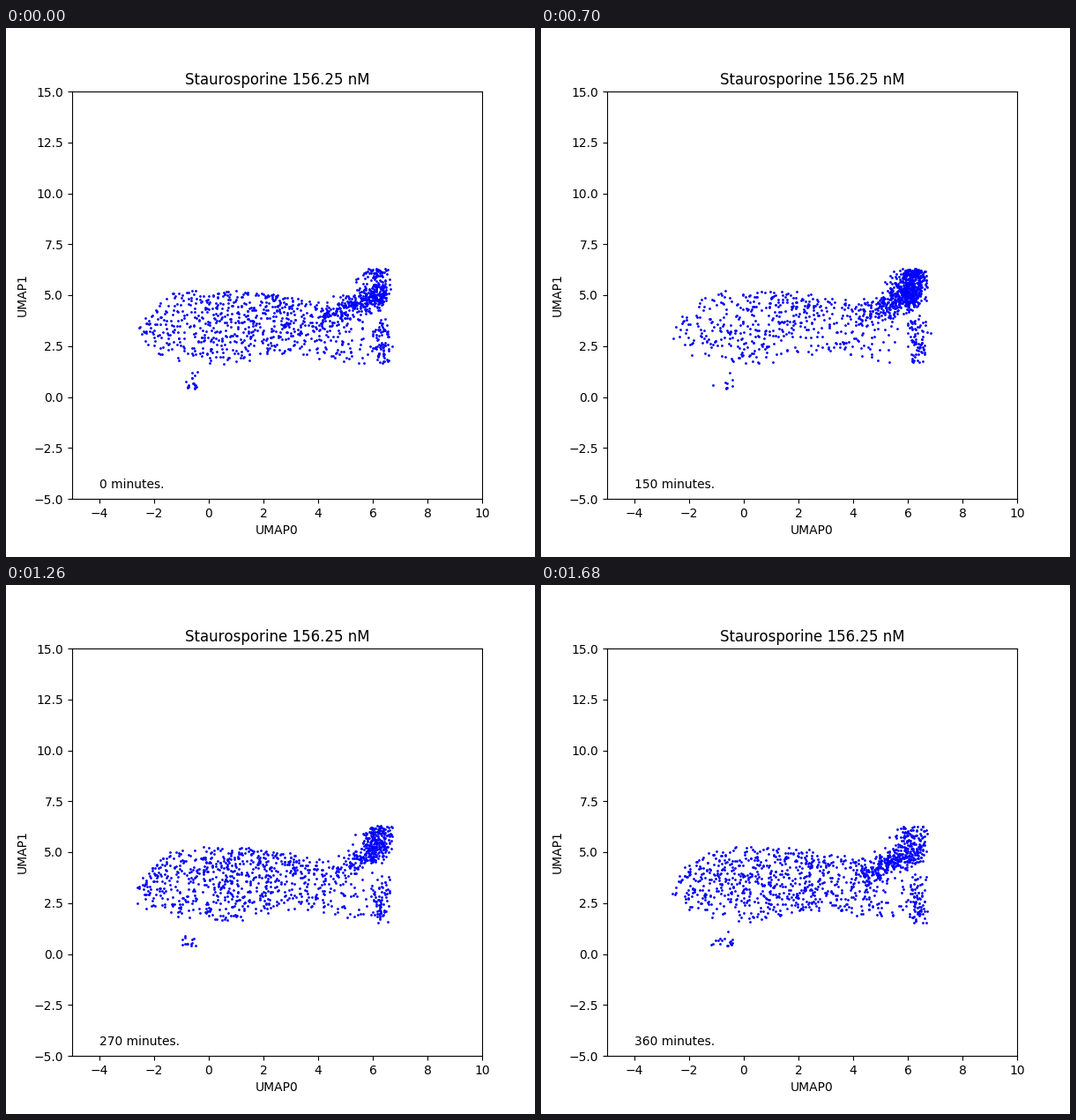
These frames come from a looping animation (600 px wide and 600 px high, 1820 ms). A matplotlib script:

```python
import numpy as np
import matplotlib.pyplot as plt
from matplotlib.animation import FuncAnimation

FRAMES, INTERVAL, STEP = 13, 140, 30

plt.rcParams["text.kerning_factor"] = 6


def bump(t, center, width):
    return np.exp(-0.5 * ((t - center) / width) ** 2)


def body(rng, n, lean):
    """Wide band with a rounded left end and a waist near x = 3."""
    x = -2.65 + 8.75 * rng.beta(1.6, 1.75 + 0.55 * lean, n)
    end = np.clip((x + 2.7) / 1.9, 0, 1)
    cap = np.sqrt(1 - (1 - end) ** 2)
    top = 5.25 - 0.05 * (x - 0.5) ** 2
    bottom = 1.85 - 0.3 * np.cos(1.05 * x)
    low, high = 2.6 + cap * (bottom - 2.6), 2.6 + cap * (top - 2.6)
    y = low + (high - low) * rng.beta(1.2, 1.0, n)
    return x, y + rng.normal(0, 0.06, n)


def arm(rng, n):
    """Dense streak rising from the waist to the head."""
    x = 4.0 + 2.5 * rng.beta(1.8, 1.2, n)
    return x, 3.95 + 0.48 * (x - 4.1) + rng.normal(0, 0.31, n).clip(-0.7, 0.8)


def head(rng, n):
    y = 4.4 + 1.9 * rng.beta(1.8, 1.2, n)
    x = 6.1 + 0.18 * (y - 5.4) + rng.normal(0, 0.33, n)
    return np.where(x > 6.7, 12.75 - x, x), y


def strip(rng, n):
    x = 6.33 + rng.normal(0, 0.18, n).clip(-0.4, 0.5)
    return x, 1.5 + 2.7 * rng.beta(1.5, 1.9, n)


def islet(rng, n):
    x = -0.4 - np.abs(rng.normal(0, 0.32, n))
    return x, 0.4 + rng.exponential(0.22, n).clip(0, 0.9)


def cloud(t):
    """Fresh sample of cells; the population moves to the head and back."""
    rng = np.random.default_rng(1000 + t)
    n_body = 760 - 340 * bump(t, 120, 65)
    n_arm = 260 + 150 * bump(t, 75, 50) - 190 * bump(t, 240, 45)
    n_head = 110 + 300 * bump(t, 175, 70)
    n_islet = 13 + 4 * np.cos(2 * np.pi * t / 360)
    return np.hstack([
        body(rng, int(n_body), bump(t, 225, 60)),
        arm(rng, int(n_arm)),
        head(rng, int(n_head)),
        strip(rng, 80),
        islet(rng, int(n_islet)),
    ])


fig, ax = plt.subplots(figsize=(6, 6), dpi=100)
ax.set(xlim=(-5, 10), ylim=(-5, 15), xlabel="UMAP0", ylabel="UMAP1",
       title="Staurosporine 156.25 nM")
dots, = ax.plot([], [], "b.", markersize=2)
label = ax.text(-4, -4.5, "")


def update(i):
    minute = i * STEP
    dots.set_data(*cloud(minute))
    label.set_text(f"{minute} minutes.")
    return dots, label


anim = FuncAnimation(fig, update, frames=FRAMES, interval=INTERVAL, repeat=True)
plt.show()
```
